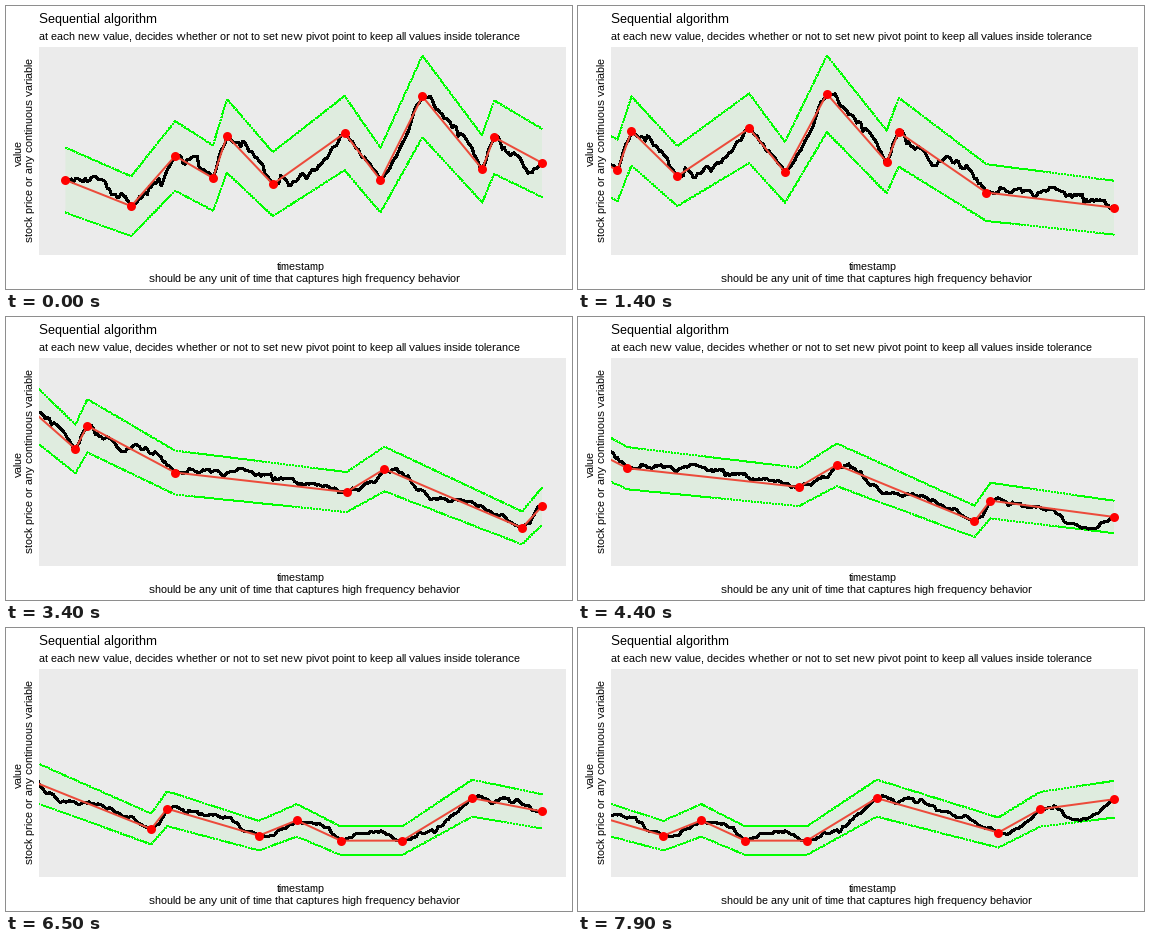
A matplotlib script for the animation above (8000 ms loop, 566x283 px).

```python
import numpy as np
import matplotlib.pyplot as plt
from matplotlib.animation import FuncAnimation

W, H, DPI = 566, 283, 100
LEFT, RIGHT, TOP, BOTTOM = 33, 560, 41, 249
FRAMES, WINDOW, STEP = 80, 240, 6
DX, X_LAST = 1.994, 536
COUNT = WINDOW + STEP * (FRAMES - 1)
TOL = 0.1

plt.rcParams.update({
    "font.family": "Liberation Sans",
    "text.hinting": "native",
    "text.hinting_factor": 1,
})

# Key points of the walk: sample index and level relative to the highest peak
PIVOTS = {
    0: .795, 33: .731, 55: .854, 74: .800, 81: .903, 104: .785, 140: .910,
    158: .795, 179: 1.0, 209: .822, 215: .900, 259: .742, 345: .676,
    364: .754, 433: .555, 441: .628, 487: .531, 506: .586, 528: .513,
    559: .513, 594: .666, 655: .542, 676: .626, 713: .662,
}
# Dips and bounces that never become pivots
TURNS = {232: .812, 239: .837, 387: .652, 692: .590}


def px(n):
    return n * 72 / DPI


def jitter(rng):
    """Mean-reverting walk with mostly small steps and a few jumps."""
    kicks = 0.0055 * rng.standard_t(3, COUNT)
    noise = np.zeros(COUNT)
    for j in range(1, COUNT):
        noise[j] = np.clip(0.75 * noise[j - 1] + kicks[j], -0.022, 0.022)
    return noise


def make_series():
    """Legs between key points; the price lags behind each straight leg."""
    knots = {**PIVOTS, **TURNS}
    keys = sorted(knots)
    i = np.arange(COUNT)
    level = np.interp(i, keys, [knots[k] for k in keys])
    for a, b in zip(keys, keys[1:]):
        u = (i[a:b] - a) / (b - a)
        side = 1 if knots[b] <= knots[a] else -1
        level[a:b] += side * 0.028 * min(1, (b - a) / 30) * np.sin(np.pi * u)
    gap = np.abs(i[:, None] - np.array(keys)).min(axis=1)
    fade = np.clip(gap / 4, 0, 1)
    series = level * (1 + fade * jitter(np.random.default_rng(12)))
    return np.clip(series, 0.509, 1.0)


def confirm_times(value):
    """Sample at which each pivot is set: its chord has left the tolerance."""
    keys = list(PIVOTS)
    times = {0: 0}
    last, k = 0, 1
    for n in range(1, COUNT):
        while k < len(keys) and keys[k] < n:
            p = keys[k]
            chord = np.interp(p, [last, n], [value[last], value[n]])
            if abs(value[p] - chord) <= 0.095 * chord:
                break
            times[p] = n
            last, k = p, k + 1
    return times


value = make_series()
lowest = np.minimum.accumulate(value)
confirmed = confirm_times(value)

fig = plt.figure(figsize=(W / DPI, H / DPI), dpi=DPI, facecolor="white")


def label(x, y, text, size=11, **kw):
    fig.text(x / W, 1 - y / H, text, fontsize=px(size), color="black",
             va="baseline", rotation_mode="anchor", **kw)


label(33, 17, "Sequential algorithm", 13)
label(33, 34, "at each new value, decides whether or not to set new pivot "
              "point to keep all values inside tolerance")
label(295, 264, "timestamp", ha="center")
label(298.5, 276, "should be any unit of time that captures high frequency "
                  "behavior", ha="center")
label(16, 147.5, "value", ha="center", rotation=90)
label(27, 143.5, "stock price or any continuous variable", ha="center",
      rotation=90)

ax = fig.add_axes([LEFT / W, 1 - BOTTOM / H,
                   (RIGHT - LEFT) / W, (BOTTOM - TOP) / H])
ax.set(xlim=(LEFT, RIGHT), ylim=(BOTTOM, TOP), xticks=[], yticks=[],
       facecolor="#ebebeb")
for side in ax.spines.values():
    side.set_visible(False)

band, = ax.fill([], [], color="#00ff00", alpha=0.05, lw=0)
edge = dict(color="#00ff00", lw=px(1), ls=(0, (2, 2)), dash_capstyle="butt",
            antialiased=False)
upper, = ax.plot([], [], **edge)
lower, = ax.plot([], [], **edge)
price, = ax.plot([], [], color="black", lw=px(2), antialiased=False)
trend, = ax.plot([], [], color="#ec4b3b", lw=px(2))
dots, = ax.plot([], [], "o", color="#ff0000", ms=px(9), mew=0)


def update(frame):
    n = WINDOW + STEP * frame
    end = n - 1
    scale = 189.7 / (1.196 - lowest[end])

    def to_x(i):
        return X_LAST - (end - i) * DX

    def to_y(v):
        return 49.6 + scale * (1.1 - v)

    i = np.arange(n)
    price.set_data(to_x(i), to_y(value[:n]))

    p = np.array([k for k, t in confirmed.items() if t <= end] + [end])
    x, v = to_x(p), value[p]
    hi, lo = to_y(v * (1 + TOL)), to_y(v * (1 - TOL))
    trend.set_data(x, to_y(v))
    dots.set_data(x, to_y(v))
    upper.set_data(x, hi)
    lower.set_data(x, lo)
    band.set_xy(np.column_stack([np.r_[x, x[::-1]], np.r_[hi, lo[::-1]]]))
    return band, upper, lower, price, trend, dots


anim = FuncAnimation(fig, update, frames=FRAMES, interval=100, repeat=True,
                     repeat_delay=0)
plt.show()
```
